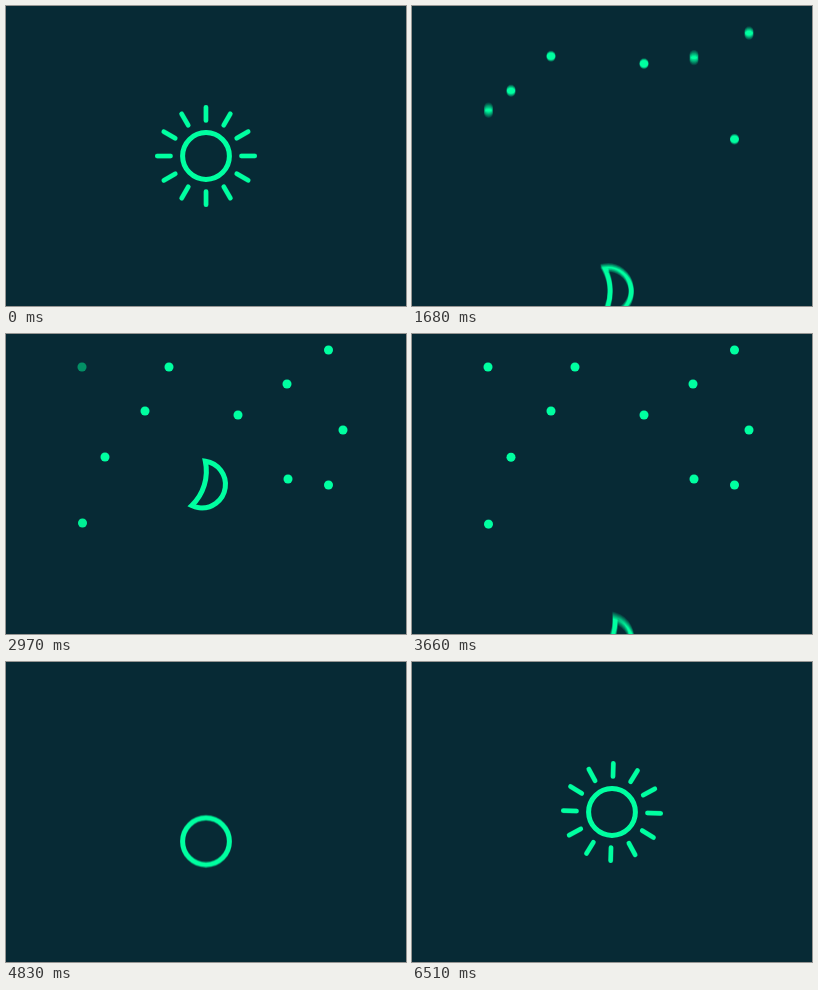
Recreate the animation shown at these times as an HTML page with a canvas. Size 400 px wide and 300 px high, loop 6.54 s.

```html
<!DOCTYPE html>
<html lang="en">
<head>
<meta charset="utf-8">
<title>Day and night</title>
<style>
html, body { margin: 0; height: 100%; overflow: hidden; background: #072a35; }
canvas { display: block; }
</style>
</head>
<body>
<canvas id="stage" width="400" height="300"></canvas>
<script>
const LOOP = 6540, NOON = 3000, SHUTTER = 14, SAMPLES = 8, TAU = Math.PI * 2;
const ctx = document.getElementById('stage').getContext('2d');

// Column, resting height and arrival time, in the order in which the stars leave.
const stars = [
  [76.5, 189, 1520], [99, 123, 1460], [163, 33, 1690], [322.5, 16, 1660],
  [76, 33, 1690], [281, 50, 1670], [337, 96, 1594], [232, 81, 1444],
  [282, 145, 1580], [139, 77, 1470], [322.5, 151, 1343]
];

const radians = deg => deg * TAU / 360;
const progress = (t, start, length) => Math.min(1, Math.max(0, (t - start) / length));
const easeIn = (t, start, length) => progress(t, start, length) ** 3;
const easeOut = (t, start, length) => 1 - (1 - progress(t, start, length)) ** 3;

function drawSun(t) {
  const setting = t < NOON;
  const drop = setting ? easeIn(t, 794, 800) : 1 - easeOut(t, 4332, 1100);
  if (drop === 1) return;
  ctx.save();
  ctx.translate(200, 150 + 180 * drop);
  ctx.lineWidth = 5;
  ctx.beginPath();
  ctx.arc(0, 0, 23.4, 0, TAU);
  ctx.stroke();

  // The rays shrink outwards one by one, and later grow back in the same order.
  ctx.rotate(radians(240) - TAU * t / LOOP);
  ctx.lineWidth = 4.7;
  for (let i = 0; i < 12; i++) {
    const part = progress(t, (setting ? 385 : 5200) + i * 75, 75);
    const [from, to] = setting ? [part, 1] : [0, part];
    if (from < to) {
      ctx.beginPath();
      ctx.moveTo(35.5 + 13.2 * from, 0);
      ctx.lineTo(35.5 + 13.2 * to, 0);
      ctx.stroke();
    }
    ctx.rotate(radians(30));
  }
  ctx.restore();
}

function drawMoon(t) {
  const drop = 1 - easeOut(t, 1567, 1340) + easeIn(t, 2840, 850);
  if (drop >= 1) return;
  const half = 23.2, chord = -7.8, center = -4.2, bulge = 6;
  const inner = half * half / (2 * bulge) + bulge / 2;
  const tip = Math.atan2(half, chord - center), bend = Math.asin(half / inner);
  ctx.save();
  ctx.translate(200, 151 + 175 * drop);
  ctx.rotate(radians((t - 1680) / 76));
  ctx.lineWidth = 5;
  ctx.beginPath();
  ctx.arc(center, 0, Math.hypot(half, chord - center), -tip, tip);
  ctx.arc(chord + bulge - inner, 0, inner, bend, -bend, true);
  ctx.closePath();
  ctx.stroke();
  ctx.restore();
}

function drawStars(t) {
  stars.forEach(([x, rest, arrive], i) => {
    const leave = 3525 + 70 * i - i * i;
    const y = -10 + (rest + 10) * easeOut(t, arrive, 650) + (310 - rest) * easeIn(t, leave, 650);
    // Each star twinkles once, in a shuffled order.
    const blink = progress(t, 1990 + 110 * ((3 * i + 7) % 11), 220);
    ctx.globalAlpha = (1 - 0.52 * Math.sin(Math.PI * blink)) / SAMPLES;
    ctx.beginPath();
    ctx.arc(x, y, 4.5, 0, TAU);
    ctx.fill();
  });
}

// Averages several moments of the shutter for motion blur.
function draw(now) {
  ctx.clearRect(0, 0, 400, 300);
  ctx.globalCompositeOperation = 'lighter';
  ctx.fillStyle = ctx.strokeStyle = '#00ff9c';
  ctx.lineCap = 'round';
  for (let i = 0; i < SAMPLES; i++) {
    const shift = ((i + 0.5) / SAMPLES - 0.5) * SHUTTER;
    const t = (now + shift + LOOP) % LOOP;
    ctx.globalAlpha = 1 / SAMPLES;
    drawSun(t);
    drawMoon(t);
    drawStars(t);
  }
}

const begin = performance.now();
function tick() {
  draw((performance.now() - begin) % LOOP);
  requestAnimationFrame(tick);
}
tick();
</script>
</body>
</html>
```
